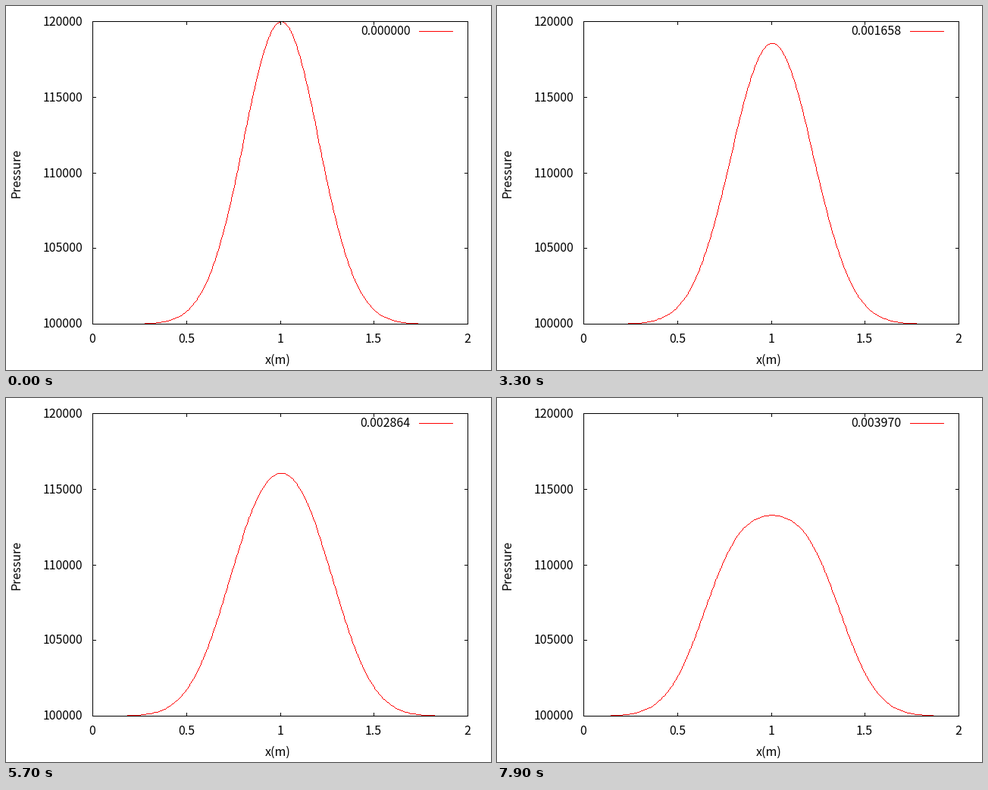
These frames come from a looping animation (640 px wide and 480 px high, 8000 ms). A matplotlib script:

```python
import numpy as np
import matplotlib.pyplot as plt
from matplotlib.animation import FuncAnimation
from matplotlib.patches import Rectangle

W, H, DPI = 640, 480, 100
FRAMES, INTERVAL = 80, 100
LEFT, RIGHT, TOP, BOTTOM = 114, 609, 20, 419
N = 200
DX = 2 / (N - 1)
DT = 0.01 / (N - 1)
GAMMA, P0, C0 = 1.4, 1e5, 43.0

plt.rcParams["font.family"] = "Noto Sans CJK JP"


def rates(state):
    """Time derivatives of density, speed and pressure in a 1D gas."""
    rho, u, p = state
    rho_x, u_x, p_x = np.gradient(state, DX, axis=1)
    return np.array([-u * rho_x - rho * u_x,
                     -u * u_x - p_x / rho,
                     -u * p_x - GAMMA * p * u_x])


def rk4(state):
    a = rates(state)
    b = rates(state + DT / 2 * a)
    c = rates(state + DT / 2 * b)
    d = rates(state + DT * c)
    return state + DT / 6 * (a + 2 * b + 2 * c + d)


def solve():
    pulse = P0 + 20000 * np.exp(-((x - x[N // 2]) / 0.2) ** 2 / 2)
    state = np.array([np.full(N, GAMMA * P0 / C0 ** 2), np.zeros(N), pulse])
    history = []
    for _ in range(FRAMES):
        history.append(state[2])
        state = rk4(state)
    return history


def to_px(xs, ps):
    px = LEFT + xs / 2 * (RIGHT - LEFT)
    py = BOTTOM - (ps - P0) / 20000 * (BOTTOM - TOP)
    return np.rint(px).astype(int), np.rint(py).astype(int)


def trace(px, py):
    """One-pixel polyline without smoothing, as an RGBA layer."""
    layer = np.zeros((H, W, 4), np.uint8)
    for x0, y0, x1, y1 in zip(px, py, px[1:], py[1:]):
        n = max(abs(x1 - x0), abs(y1 - y0), 1) + 1
        cols = np.rint(np.linspace(x0, x1, n)).astype(int)
        rows = np.rint(np.linspace(y0, y1, n)).astype(int)
        layer[rows, cols] = 255, 0, 0, 255
    return layer


x = np.arange(N) * DX
pressure = solve()

fig = plt.figure(figsize=(W / DPI, H / DPI), dpi=DPI, facecolor="white")
ax = fig.add_axes([0, 0, 1, 1])
curve = ax.imshow(np.zeros((H, W, 4), np.uint8), extent=(0, W, H, 0),
                  interpolation="nearest", aspect="auto", zorder=1)
ax.set_xlim(0, W)
ax.set_ylim(H, 0)
ax.axis("off")


def line(x0, y0, x1, y1, color="black"):
    """Horizontal or vertical run of pixels, both ends included."""
    ax.add_patch(Rectangle((x0, y0), x1 - x0 + 1, y1 - y0 + 1, lw=0,
                           facecolor=color, antialiased=False, zorder=2))


def label(px, py, text, ha="center", **kw):
    return ax.text(px, py, text, ha=ha, va="baseline", color="black",
                   fontsize=16 * 72 / DPI, **kw)


for row in (TOP, BOTTOM):
    line(LEFT, row, RIGHT, row)
for col in (LEFT, RIGHT):
    line(col, TOP, col, BOTTOM)

for k in range(5):
    cols, rows = to_px(np.array([k / 2]), np.array([P0 + 5000 * k]))
    col, row = cols[0], rows[0]
    line(col, BOTTOM - 4, col, BOTTOM)
    line(col, TOP, col, TOP + 4)
    line(LEFT, row, LEFT + 4, row)
    line(RIGHT - 4, row, RIGHT, row)
    label(col, 443.5, f"{k / 2:g}")
    label(101.5, row + 5.5, f"{100000 + 5000 * k}", ha="right")

label(359, 471.5, "x(m)")
label(18, 220.5, "Pressure", rotation=90, rotation_mode="anchor")
clock = label(533.5, 38.5, "", ha="right")
line(545, 33, 589, 33, "red")


def update(i):
    curve.set_data(trace(*to_px(x, pressure[i])))
    clock.set_text(f"{i * DT:.6f}")
    return curve, clock


anim = FuncAnimation(fig, update, frames=FRAMES, interval=INTERVAL,
                     repeat=True, repeat_delay=0)
plt.show()
```
